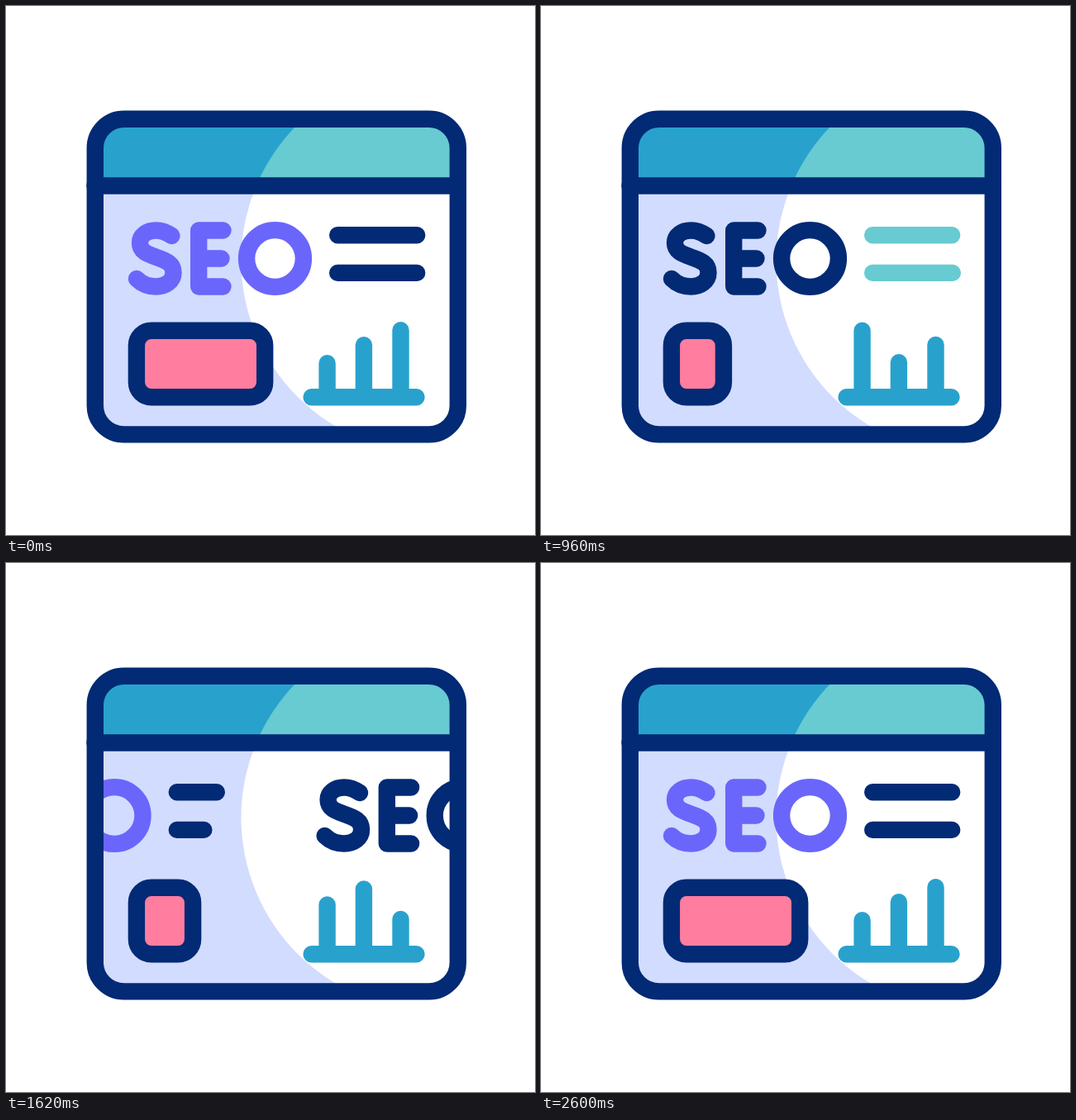
Recreate the animation shown at these times as an HTML page. Size 640x640 px, loop 2620 ms.

```html
<!DOCTYPE html>
<html lang="en">
<head>
<meta charset="utf-8">
<title>Search page</title>
<style>
  html, body { margin: 0; width: 100%; height: 100%; overflow: hidden; background: #fff; }
  svg { display: block; width: 100%; height: 100%; }
  .line { fill: none; stroke-width: 20.4; stroke-linecap: round; stroke-linejoin: round; }
  .navy { stroke: #022a75; }
  .violet { stroke: #6a66fb; }
  .teal { stroke: #67cbd1; }
  .blue { stroke: #28a2cd; }
</style>
</head>
<body>
<svg viewBox="0 0 640 640">
  <defs>
    <clipPath id="page"><rect x="107.8" y="136.8" width="439" height="381.6" rx="35"/></clipPath>
    <clipPath id="top"><rect x="107" y="136" width="441" height="81.5"/></clipPath>
    <g id="word">
      <path d="M200.5 278C194 273.5 188 271.5 181.5 271.5C170 271.5 162 278 162 286.5C162 297 171 300 182 304C193 308 202.5 311 202.5 322.5C202.5 333 193 339.5 181.5 339.5C172 339.5 164 336 158 330"/>
      <path d="M262.5 271.5H233.2V339.5H262.5M233.2 305.5H260.5"/>
      <circle cx="325.5" cy="305.5" r="34.4"/>
    </g>
  </defs>

  <g clip-path="url(#page)">
    <rect x="100" y="130" width="460" height="400" fill="#d2dcfe"/>
    <circle cx="517.5" cy="308" r="233" fill="#fff"/>
    <g clip-path="url(#top)">
      <rect x="100" y="130" width="460" height="90" fill="#28a2cd"/>
      <circle cx="517.5" cy="308" r="233" fill="#67cbd1"/>
    </g>
    <g id="slideA" class="line">
      <use href="#word" class="violet"/>
      <path class="navy"/>
    </g>
    <g id="slideB" class="line">
      <use href="#word" class="navy"/>
      <path class="teal"/>
    </g>
  </g>

  <rect id="box" class="line navy" x="157.9" y="392.7" height="80.6" rx="18" style="fill:#ff7d9f"/>
  <path id="chart" class="line blue"/>
  <g class="line navy">
    <rect x="107.8" y="136.8" width="439" height="381.6" rx="35"/>
    <path d="M107.5 217.5H546.8"/>
  </g>
</svg>
<script>
const LOOP = 2620, HALF = 1200;
const $ = id => document.getElementById(id);
const slides = ['slideA', 'slideB'].map($);
const box = $('box'), chart = $('chart');

const ease = u => {
  u = Math.min(1, Math.max(0, u));
  return u * u * (3 - 2 * u);
};

// Keys are [time, value] pairs with an eased move between neighbours.
function track(keys, t) {
  let v = keys[0][1];
  for (let i = 1; i < keys.length; i++) {
    const [t0, v0] = keys[i - 1], [t1, v1] = keys[i];
    if (t >= t0) v = v0 + (v1 - v0) * ease((t - t0) / (t1 - t0));
  }
  return v;
}

const upper = [[240, 0], [640, 112], [840, 96]];
const lower = [[200, 0], [820, 112], [980, 96]];
const boxRight = [[0, 323.4], [600, 345.5], [1000, 228], [1400, 245], [1800, 230], [2400, 323.4]];
const barX = [388.6, 432.9, 477.5];
const barTop = [
  [422, 382, 404.5, 422],
  [400, 422, 382.3, 400],
  [382, 399.3, 422, 382]
].map(tops => tops.map((y, i) => [[0, 880, 1740, 2600][i], y + 10.2]));

function setSlide(slide, x, t) {
  slide.setAttribute('transform', `translate(${x} 0)`);
  slide.lastElementChild.setAttribute('d',
    `M401.2 277.2h${track(upper, t)}M401.2 322.9h${track(lower, t)}`);
}

function draw(t) {
  const second = t >= HALF;
  const local = second ? t - HALF : t;
  const gap = second ? 422 : 433;
  const x = gap * ease(local / 800);
  const leaving = second ? 1 : 0;
  setSlide(slides[leaving], x, LOOP);
  setSlide(slides[1 - leaving], x - gap, local);

  box.setAttribute('width', track(boxRight, t) - 10.2 - 157.9);
  chart.setAttribute('d', 'M369.6 473.2H496.5' +
    barX.map((bx, i) => `M${bx} 473.2V${track(barTop[i], t)}`).join(''));
}

const start = performance.now();
function tick() {
  draw((performance.now() - start) % LOOP);
  requestAnimationFrame(tick);
}
tick();
</script>
</body>
</html>
```
